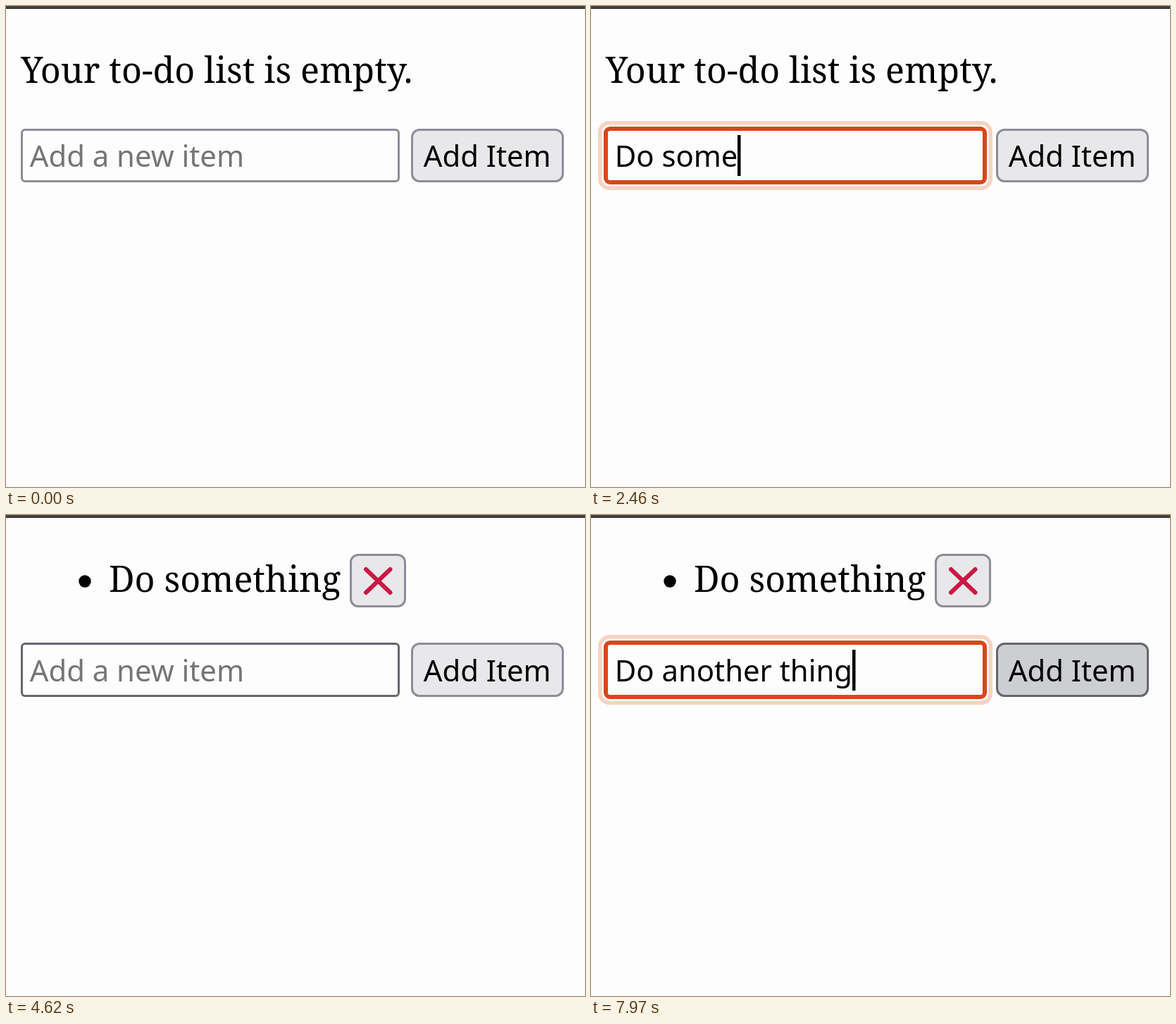
An HTML page with a canvas for the animation above (8000 ms loop, 822 by 682 pixels).

```html
<!DOCTYPE html>
<html lang="en">
<head>
<meta charset="utf-8">
<title>To-do list</title>
<style>
  html, body { margin: 0; width: 100%; height: 100%; overflow: hidden; background: #fdfdfd; }
  canvas { display: block; }
</style>
</head>
<body>
<canvas id="stage" width="822" height="682"></canvas>
<script>
const ctx = document.getElementById('stage').getContext('2d');
const LOOP = 8000;
const SERIF = '50.2px "Noto Serif", serif';
const SANS = '41.83px "Noto Sans", sans-serif';
const PAPER = '#fdfdfd';
const ACCENT = '#dc4518';
const BOX = 76.4;

// Key times for each typed character.
const FIRST = { text: 'Do something',
  times: [1610, 1780, 1900, 2050, 2200, 2290, 2460, 2490, 2550, 2620, 2820, 2960] };
const SECOND = { text: 'Do another thing',
  times: [5460, 5720, 5820, 6020, 6190, 6540, 6690, 6750, 6820, 6900, 7000, 7100, 7130, 7160, 7330, 7360] };

const BUTTON = {
  normal: ['#e8e8ea', '#8d8d98'],
  hover: ['#cdced1', '#66666f'],
  active: ['#b1b1b9', '#484851']
};

const between = (t, a, b) => t >= a && t < b;
const typed = (entry, t) => entry.text.slice(0, entry.times.filter(k => k <= t).length);

// Box edges snap to whole pixels.
function frame(x, y, w, h, r, line, stroke, fill) {
  const top = Math.round(y), bottom = Math.round(y + h);
  ctx.beginPath();
  ctx.roundRect(x + line / 2, top + line / 2, w - line, bottom - top - line, r - line / 2);
  if (fill) {
    ctx.fillStyle = fill;
    ctx.fill();
  }
  ctx.lineWidth = line;
  ctx.strokeStyle = stroke;
  ctx.stroke();
}

function label(text, x, y, font, color = '#000') {
  ctx.font = font;
  ctx.fillStyle = color;
  ctx.fillText(text, x, Math.round(y));
}

function drawItem() {
  ctx.fillStyle = '#000';
  ctx.beginPath();
  ctx.arc(112, 94, 8.7, 0, Math.PI * 2);
  ctx.fill();
  label('Do something', 146, 109, SERIF);

  const [fill, edge] = BUTTON.normal;
  frame(488, 54.6, 80, BOX, 12, 3, edge, fill);
  ctx.strokeStyle = '#c81844';
  ctx.lineWidth = 6;
  ctx.lineCap = 'round';
  ctx.beginPath();
  ctx.moveTo(511, 77);
  ctx.lineTo(545.5, 110);
  ctx.moveTo(545.5, 77);
  ctx.lineTo(511, 110);
  ctx.stroke();
}

function drawInput(top, text, focused, hovered, caret) {
  if (focused) {
    frame(10, top - 11, 560, BOX + 22, 16, 5.5, '#f9d2c4');
    frame(18, top - 3, 544, BOX + 6, 9, 6, ACCENT, PAPER);
  } else {
    frame(21, top, 538, BOX, 6, 3, hovered ? '#66666f' : '#8d8d98', PAPER);
  }
  label(text || 'Add a new item', 33.7, top + 54.3, SANS, text ? '#000' : '#757575');
  if (focused && caret) {
    ctx.fillStyle = '#000';
    ctx.fillRect(Math.round(33.7 + ctx.measureText(text).width), Math.round(top + 9.3), 4.5, 58);
  }
}

function drawButton(top, state) {
  const [fill, edge] = BUTTON[state];
  frame(575, top, 217, BOX, 12, 3, edge, fill);
  ctx.textAlign = 'center';
  label('Add Item', 683.2, top + 54.3, SANS);
  ctx.textAlign = 'left';
}

function buttonState(t) {
  if (between(t, 3670, 3780)) return 'active';
  if (between(t, 3300, 4050) || t >= 7970) return 'hover';
  return 'normal';
}

function draw(t) {
  ctx.fillStyle = PAPER;
  ctx.fillRect(0, 0, 822, 682);
  ctx.fillStyle = '#474540';
  ctx.fillRect(0, 0, 822, 3);
  ctx.fillStyle = '#171513';
  ctx.fillRect(0, 3, 822, 1);

  const added = t >= 3780;
  const top = added ? 181.4 : 173.8;
  if (added) drawItem();
  else label('Your to-do list is empty.', 21, 109, SERIF);

  const focused = between(t, 700, 3670) || t >= 4710;
  const hovered = between(t, 60, 700) || between(t, 4620, 4710);
  const caret = !between(t, 5820, 6020);
  drawInput(top, typed(added ? SECOND : FIRST, t), focused, hovered, caret);
  drawButton(top, buttonState(t));
}

const start = performance.now();
function tick() {
  draw((performance.now() - start) % LOOP);
  requestAnimationFrame(tick);
}
tick();
</script>
</body>
</html>
```
